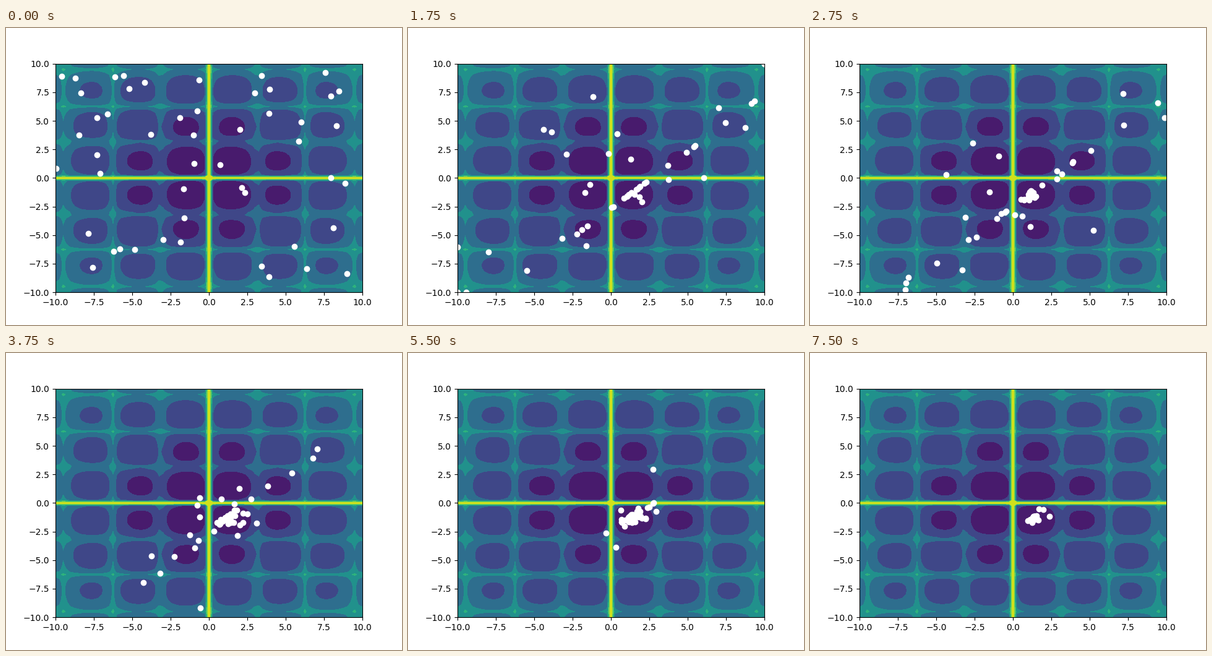
These frames come from a looping animation (640x480 px, 7.75 s). A matplotlib script:

```python
import numpy as np
import matplotlib.pyplot as plt
from matplotlib.animation import FuncAnimation

STEPS = 31
STEP_MS = 250
SWARM = 50
LIMIT = 10
FIRST_BEST = np.array([-0.95, 1.27])
FINAL_BEST = np.array([1.35, -1.30])
HOP_STEP = 5  # when the better minimum is found


def cross_in_tray(x, y):
    bowl = np.exp(np.abs(100 - np.hypot(x, y) / np.pi))
    return -0.0001 * (np.abs(np.sin(x) * np.sin(y) * bowl) + 1) ** 0.1


rng = np.random.default_rng(12)
start = rng.uniform(-LIMIT, LIMIT, (SWARM, 2))
start[0] = FIRST_BEST

# Offsets from the best point, along and across the diagonal y = x.
dx, dy = (start - FIRST_BEST).T
along0, across0 = (dx + dy) / 2, (dx - dy) / 2

rate_along, rate_across = rng.uniform(0.8, 2.4, (2, SWARM))
lifetime = rng.uniform(6, 15, SWARM)
lifetime[rng.random(SWARM) < 0.12] = 19
loose = rng.random(SWARM) < 0.45  # these also swing across the diagonal
wobble = rng.normal(0, 0.45, (2, SWARM))
wobble[:, 0] = 0


def swarm_at(step):
    """Damped swings around the best point, held inside the square."""
    best = FIRST_BEST if step < HOP_STEP else FINAL_BEST
    damping = np.exp(-(step / lifetime) ** 2)
    boost = 1 + 1.6 * (1 - np.exp(-step))
    sway = np.where(loose, 1, np.exp(-3 * step))

    along = along0 * boost * damping * np.cos(rate_along * step)
    across = across0 * sway * damping * np.cos(rate_across * step)

    # A small cloud forms late and shrinks towards the end.
    cloud = np.clip((step - 7) / 10, 0, 1) * (1.15 - step / (STEPS - 1))
    along = along + cloud * wobble[0]
    across = across + cloud * wobble[1] * 0.7

    offset = np.column_stack([along + across, along - across])
    return np.clip(best + offset, -LIMIT, LIMIT)


fig, ax = plt.subplots(figsize=(6.4, 4.8), dpi=100)
axis = np.linspace(-LIMIT, LIMIT, 81)
grid_x, grid_y = np.meshgrid(axis, axis)
ax.contourf(grid_x, grid_y, cross_in_tray(grid_x, grid_y))
dots = ax.scatter(*start.T, color="white")
ax.set(xlim=(-LIMIT, LIMIT), ylim=(-LIMIT, LIMIT))


def update(step):
    dots.set_offsets(swarm_at(step))
    return (dots,)


anim = FuncAnimation(fig, update, frames=STEPS, interval=STEP_MS,
                     repeat=True, repeat_delay=0, blit=False)
plt.show()
```
